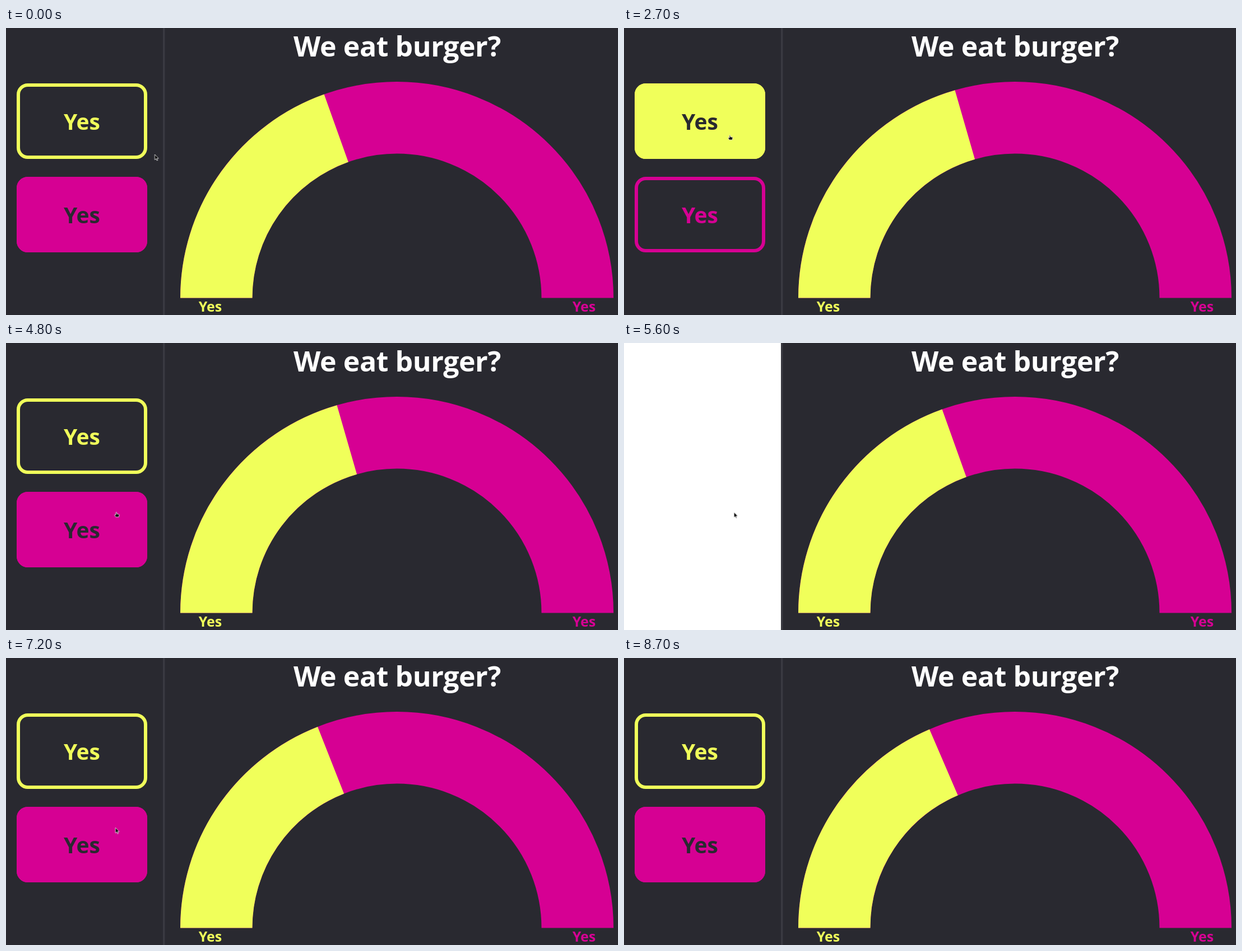
Animation of 1092 by 513 pixels, one loop 9.3 s. Source, as an HTML page:

```html
<!DOCTYPE html>
<html lang="en">
<head>
<meta charset="utf-8">
<title>Poll</title>
<style>
  :root { --bg: #292930; --yes: #f0ff5a; --no: #d60093; }
  html, body { margin: 0; width: 100%; height: 100%; overflow: hidden; background: var(--bg); }
  svg { display: block; width: 100vw; height: 100vh; }
  text { font: 700 39px "Open Sans", "Noto Sans", sans-serif; text-anchor: middle; }
  .title { font-size: 50px; letter-spacing: -.4px; fill: #fff; }
  .small { font-size: 25px; }
  .dark { fill: var(--bg); }
  .yes { --c: var(--yes); }
  .no { --c: var(--no); }
  .yes text, .no text, text.yes, text.no { fill: var(--c); }
  .yes text.dark, .no text.dark { fill: var(--bg); }
  .line { fill: none; stroke: var(--c); stroke-width: 6; }
  .full { fill: var(--c); }
  .ring { fill: none; stroke: var(--c); stroke-width: 128.5; }

  /* every change is a hard cut on a 9.3 s clock */
  .share, .panel, .buttons, .on, .cursor, .arrow, .hand { animation: 9300ms step-end infinite; }
  .share { stroke-dasharray: 180 360; animation-name: share; }
  .panel { animation-name: panel; }
  .buttons { animation-name: buttons; }
  .yes .on { animation-name: yes-on; }
  .no .on { animation-name: no-on; }
  .cursor { animation-name: move; }
  .arrow { animation-name: arrow; }
  .hand { animation-name: hand; }

  @keyframes share {
    0%, 52.688% { stroke-dashoffset: 109.66; }
    29.032% { stroke-dashoffset: 106.08; }
    70.967% { stroke-dashoffset: 111.47; }
    87.096%, 100% { stroke-dashoffset: 113.25; }
  }
  @keyframes panel {
    0%, 62.365%, 79.569%, 100% { fill: #292930; }
    60.215%, 78.494% { fill: #fff; }
  }
  @keyframes buttons {
    0%, 63.44%, 80.645%, 100% { opacity: 1; }
    60.215%, 78.494% { opacity: 0; }
  }
  @keyframes yes-on {
    0%, 51.612%, 100% { opacity: 0; }
    29.032% { opacity: 1; }
  }
  @keyframes no-on {
    0%, 51.612%, 70.967%, 87.096%, 100% { opacity: 1; }
    29.032%, 60.215%, 78.494% { opacity: 0; }
  }
  @keyframes move {
    0% { transform: translate(265.5px, 226px); }
    5.376% { transform: translate(265.5px, 219px); }
    7.526% { transform: translate(256px, 215px); }
    8.602% { transform: translate(228px, 204px); }
    9.677% { transform: translate(198px, 195px); }
    10.752% { transform: translate(189px, 191.5px); }
    31.182% { transform: translate(191px, 191.5px); }
    33.333% { transform: translate(194px, 195.5px); }
    35.483% { transform: translate(194px, 199px); }
    36.559% { transform: translate(195px, 212px); }
    37.634% { transform: translate(195.5px, 236px); }
    38.709% { transform: translate(196px, 264px); }
    39.784% { transform: translate(196.5px, 288px); }
    40.86% { transform: translate(197px, 299.5px); }
    43.01%, 66.666% { transform: translate(197px, 302.5px); }
    59.139% { transform: translate(196.3px, 302.5px); }
    65.591% { transform: translate(195.5px, 302.5px); }
    77.419% { transform: translate(195.3px, 303.3px); }
    90.322% { transform: translate(197px, 290px); }
    91.397% { transform: translate(196px, 246px); }
    92.473%, 100% { transform: translate(192px, 190px); }
  }
  @keyframes arrow {
    0%, 37.634%, 59.139%, 77.419%, 91.397% { opacity: 1; }
    8.602%, 39.784%, 66.666%, 90.322%, 92.473%, 100% { opacity: 0; }
  }
  @keyframes hand {
    0%, 37.634%, 59.139%, 77.419%, 91.397%, 93.548%, 100% { opacity: 0; }
    8.602%, 39.784%, 66.666%, 90.322%, 92.473% { opacity: 1; }
  }
</style>
</head>
<body>
<svg viewBox="0 0 1092 513" preserveAspectRatio="none">
  <rect width="1092" height="513" fill="#292930"/>
  <rect class="panel" width="280" height="513"/>
  <rect x="280" width="3.5" height="513" fill="#393941"/>

  <g class="buttons">
    <g class="yes">
      <rect class="line" x="22" y="102" width="227" height="129" rx="17"/>
      <text x="135.5" y="182">Yes</text>
      <g class="on">
        <rect class="full" x="19" y="99" width="233" height="135" rx="20"/>
        <text class="dark" x="135.5" y="182">Yes</text>
      </g>
    </g>
    <g class="no">
      <rect class="line" x="22" y="269" width="227" height="129" rx="17"/>
      <text x="135.5" y="349">Yes</text>
      <g class="on">
        <rect class="full" x="19" y="266" width="233" height="135" rx="20"/>
        <text class="dark" x="135.5" y="349">Yes</text>
      </g>
    </g>
  </g>

  <text class="title" x="698" y="51">We eat burger?</text>
  <path class="ring no" d="M375.25 482.5a322.25 322.25 0 0 1 644.5 0"/>
  <path class="ring yes share" pathLength="180" d="M375.25 482.5a322.25 322.25 0 0 1 644.5 0"/>
  <text class="small yes" x="364.5" y="506.5">Yes</text>
  <text class="small no" x="1031.5" y="506.5">Yes</text>

  <g class="cursor" stroke="#fff" stroke-width=".8" stroke-linejoin="round">
    <path class="arrow" d="M0 0V9.6L2.2 7.6 3.8 11 5.2 10.4 3.7 7.1H6.7Z"/>
    <path class="hand" d="M-.9.8Q-.9 0 0 0T.8.8V3L4.4 3.8Q5 4 5 4.8L4.2 8.4H-1.2L-3.2 5.2Q-3.4 4.2-2.4 4.2L-.9 5Z"/>
  </g>
</svg>
</body>
</html>
```
